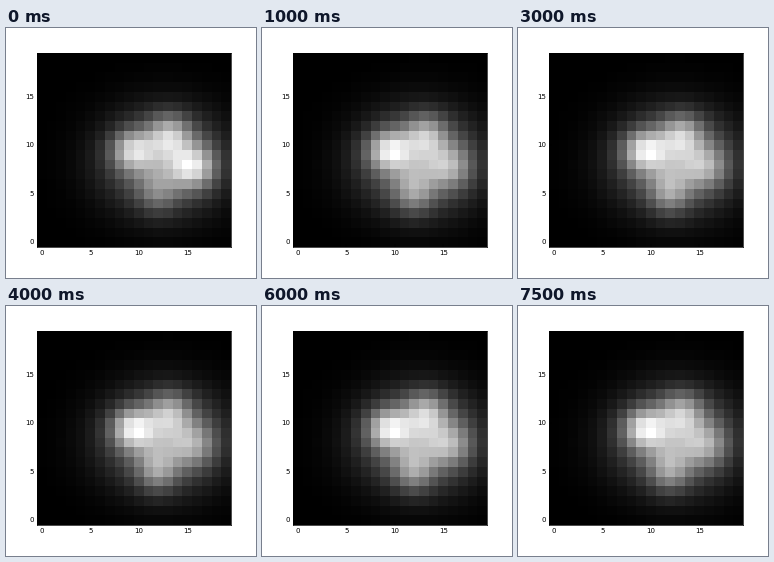
Recreate the animation shown at these times as a matplotlib script. Size 250x250 px, loop 8 s.

```python
import numpy as np
import matplotlib.pyplot as plt
from matplotlib.animation import FuncAnimation

plt.rcParams.update({"font.family": "DejaVu Sans", "font.size": 10})

STAGE, LEFT, SIDE = 250, 31, 194
SIZE = 20
STEPS = 16
X, Y = np.meshgrid(np.arange(SIZE), np.arange(SIZE))


def bump(x, y, sx, sy):
    return np.exp(-((X - x) / sx) ** 2 / 2 - ((Y - y) / sy) ** 2 / 2)


base = bump(12.6, 8.3, 4.1, 3.4)
left = bump(9.4, 9.45, 1.55, 1.4)
top = bump(13.2, 11.0, 1.5, 1.5)
right = bump(15.6, 7.8, 1.6, 1.5)
bottom = bump(11.9, 5.2, 1.4, 1.6)


def field(step):
    """Bumps settle quickly from the start, then sway gently."""
    start = np.exp(-step)
    sway = np.cos(2 * np.pi * (step - 5) / 8)
    total = (0.56 * base
             + (0.60 - 0.01 * sway - 0.05 * start) * left
             + (0.41 + 0.03 * sway + 0.10 * start) * top
             + (0.33 + 0.02 * sway + 0.28 * start) * right
             + (0.33 - 0.10 * start) * bottom)
    return total / total.max()


fig = plt.figure(figsize=(5, 5), dpi=50, facecolor="white")
ax = fig.add_axes([LEFT / STAGE, LEFT / STAGE, SIDE / STAGE, SIDE / STAGE])
image = ax.imshow(field(0), cmap="gray", vmin=0, vmax=1,
                  origin="lower", interpolation="nearest")
ax.set_xticks(range(0, SIZE, 5))
ax.set_yticks(range(0, SIZE, 5))
ax.tick_params(direction="in", length=4, width=0.5, pad=4)
plt.setp(ax.get_yticklabels(), va="center")
plt.setp(ax.spines.values(), linewidth=1)


def update(step):
    image.set_data(field(step))
    return [image]


anim = FuncAnimation(fig, update, frames=STEPS, interval=500,
                     repeat=True, repeat_delay=0)
plt.show()
```
